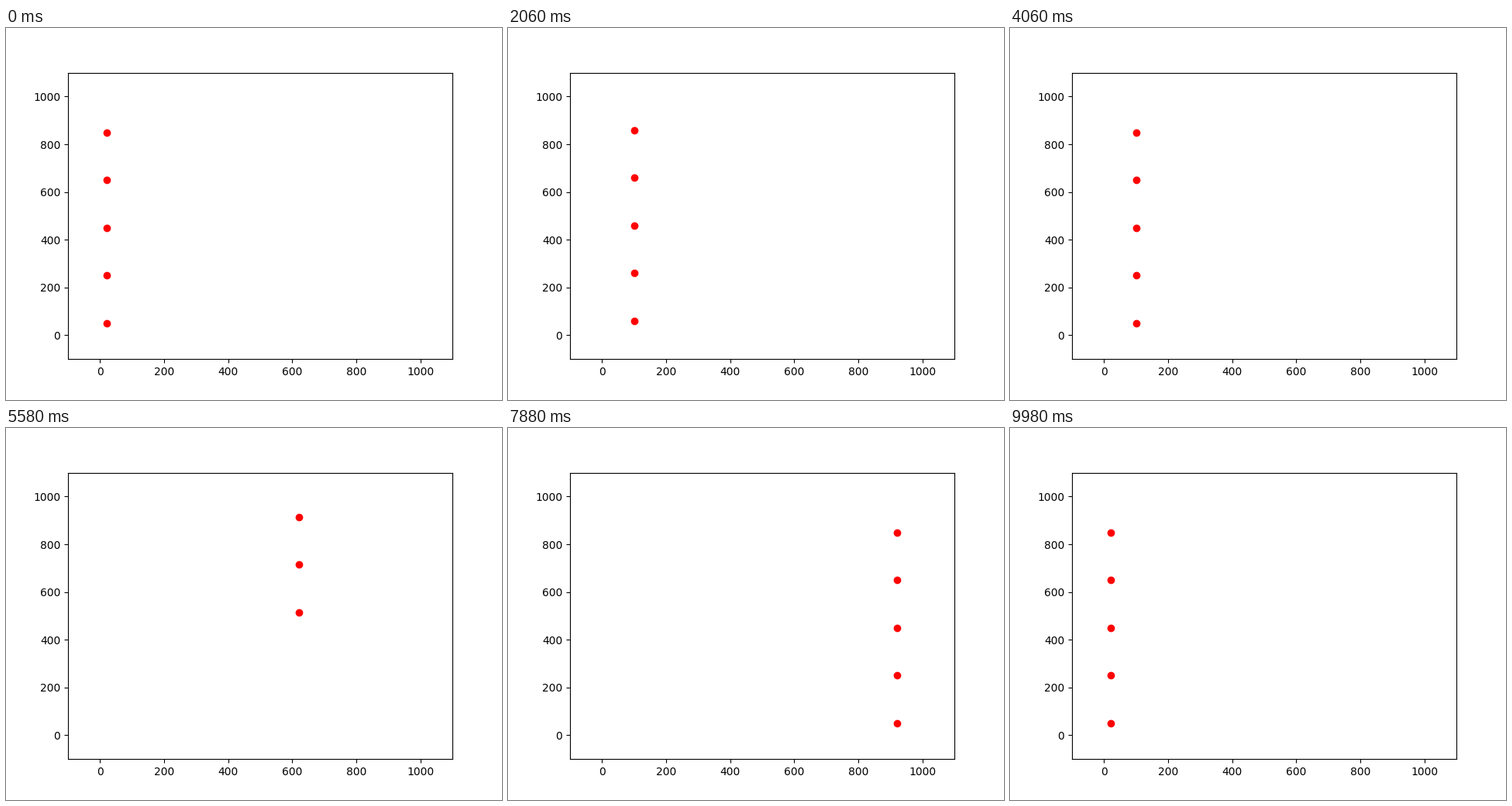
A matplotlib script that plays this animation: 640 px wide and 480 px high, repeating every 10000 ms.

```python
import numpy as np
import matplotlib.pyplot as plt
from matplotlib.animation import FuncAnimation

FRAMES = 500
INTERVAL = 20  # ms
CYCLE = 50
STEP = 20
FLAT_RUNS = {3, 4, 7, 9, 10}  # runs without upward acceleration

START_Y = 50 + 200 * np.arange(5)

fig, ax = plt.subplots(figsize=(6.4, 4.8), dpi=100)
ax.set_xlim(-100, 1100)
ax.set_ylim(-100, 1100)
balls, = ax.plot([], [], "ro")


def state(i):
    """Return the run number and the steps taken since its start."""
    if i < CYCLE - 1:
        return 0, i  # the first run is one step shorter
    return divmod(i + 1, CYCLE)


def update(i):
    run, n = state(i)
    rise = 0 if run in FLAT_RUNS else n * (n + 1) / 2
    balls.set_data(np.full(len(START_Y), STEP * (n + 1)), START_Y + rise)
    return balls,


anim = FuncAnimation(fig, update, frames=FRAMES, interval=INTERVAL,
                     init_func=lambda: update(0), repeat=True, repeat_delay=0)
plt.show()
```
